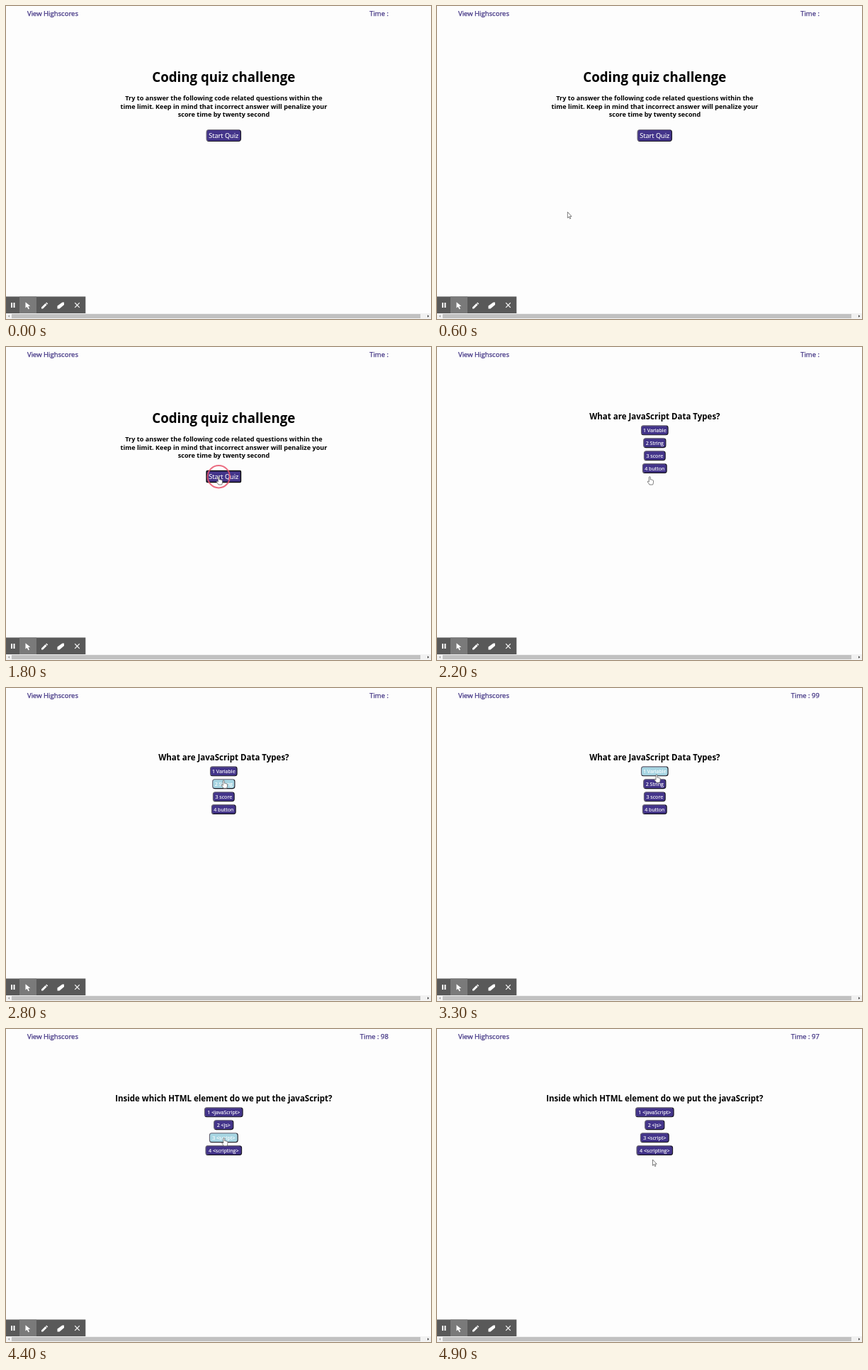
An HTML page that plays this animation: 600x441 px, repeating every 5 s.

```html
<!DOCTYPE html>
<html lang="en">
<head>
<meta charset="utf-8">
<title>Coding quiz</title>
<style>
html, body { margin: 0; width: 100%; height: 100%; overflow: hidden; background: #fdfdfd; }
svg { display: block; width: 600px; height: 441px; font-family: "Open Sans", "Noto Sans", sans-serif; }
.nav { font-size: 9.52px; fill: #3d2f80; stroke: #3d2f80; stroke-width: .25; }
.mid { text-anchor: middle; }
.bold { font-weight: 700; fill: #000; }
.btn rect { fill: #43348a; stroke: url(#bevel); stroke-width: 1.1; }
.btn text { fill: #fff; stroke: #fff; stroke-width: .15; text-anchor: middle; }
.btn.hover rect { fill: #a6d5e2; }
.btn.press rect { stroke: #080808; stroke-width: 1.4; }
</style>
</head>
<body>
<svg viewBox="0 0 600 441">
  <defs>
    <linearGradient id="bevel" x1="0" y1="0" x2="1" y2="1">
      <stop offset=".5" stop-color="#65606f"/>
      <stop offset=".5" stop-color="#17151f"/>
    </linearGradient>
  </defs>
  <rect width="600" height="441" fill="#fdfdfd"/>
  <text class="nav" x="30" y="13.5">View Highscores</text>
  <text class="nav" id="time" x="540" y="13.5" text-anchor="end">Time :</text>

  <g id="intro" class="mid bold">
    <text x="307.3" y="107" font-size="18.7">Coding quiz challenge</text>
    <g font-size="9.1">
      <text x="307.5" y="132.8">Try to answer the following code related questions within the</text>
      <text x="307.5" y="144.5">time limit. Keep in mind that incorrect answer will penalize your</text>
      <text x="307.5" y="156.2">score time by twenty second</text>
    </g>
  </g>
  <text id="question" class="mid bold" x="307.4" y="101.8" font-size="11.5"></text>
  <g id="buttons"></g>

  <g id="toolbar">
    <rect y="409.4" width="112.3" height="23.6" fill="#595959"/>
    <rect x="19" y="409.4" width="24" height="23.6" fill="#7a7a7a"/>
    <g fill="#fff">
      <path d="M7 418h2v7h-2zM10.5 418h2v7h-2z"/>
      <path d="M27.5 417.3V425.5L29.6 423.8L31.5 427.3L33 426.5L31.3 423.2L34.3 422.8Z"/>
      <path d="M50 426.6V424.5L55.5 419L57.6 421.1L52.1 426.6ZM56.1 418.4L57.2 417.4L59.2 419.4L58.2 420.5Z"/>
      <path d="M72.5 422.5L79.5 417.5H82V421L75.5 426.5H72.5Z"/>
    </g>
    <path d="M97.2 418.2L103.8 424.8M103.8 418.2L97.2 424.8" stroke="#fff" stroke-width="1.2"/>
  </g>
  <g id="scrollbar">
    <rect y="433" width="600" height="7.5" fill="#f1f1f1"/>
    <rect x="8" y="434" width="577" height="6" fill="#c1c1c1"/>
    <path d="M5 435.3V438.7L3 437Z" fill="#999"/>
    <path d="M595 435.2V438.8L597.3 437Z" fill="#444"/>
  </g>

  <circle id="ring" r="15.7" fill="none" stroke="#e8546c" stroke-width="2"/>
  <g id="cursor" fill="#fff" stroke="#555" stroke-width=".75" stroke-linejoin="round">
    <path id="arrow" d="M0 0V8.4L1.9 6.7L3.2 9.6L4.5 9L3.2 6.2H5.7Z"/>
    <path id="hand" d="M-1 1Q-1 0 0 0T1 1V4.2Q1.9 3.6 2.6 4.5Q3.5 4 4 4.9Q5.2 4.7 5.2 5.9V8Q5.2 9.4 4.3 11.3H-.3Q-1.1 9.7-3 7.5Q-3.2 6.2-2 6.4L-1 7.3Z"/>
  </g>
</svg>
<script>
const LOOP = 5000, STEP = 100, MID = 307.3;
const START = 1900, NEXT = 4200;
const CLICKS = [1800, 4100];

const screens = [
  { text: "", buttons: [["Start Quiz", 48.4]] },
  { text: "What are JavaScript Data Types?",
    buttons: [["1 Variable", 37.6], ["2 String", 31.2], ["3 score", 29.8], ["4 button", 33.8]] },
  { text: "Inside which HTML element do we put the javaScript?",
    buttons: [["1 <javaScript>", 53.6], ["2 <js>", 27.2], ["3 <script>", 39.8], ["4 <scripting>", 50.6]] }
];

// time, x, y of the pointer tip
const path = [
  [100, 118, 400], [400, 178, 300], [500, 178, 300], [1000, 239, 206],
  [1100, 239, 206], [1500, 300.3, 182.7], [2300, 300.3, 182.7], [3000, 309, 117],
  [3300, 310, 122], [3600, 310, 122], [4000, 310, 135], [4200, 310, 135],
  [4500, 307, 160], [4600, 307, 160], [4900, 304.5, 184]
];

const el = id => document.getElementById(id);
const show = (node, on) => node.setAttribute("display", on ? "inline" : "none");

function make(tag, attrs, parent) {
  const node = document.createElementNS("http://www.w3.org/2000/svg", tag);
  for (const k in attrs) node.setAttribute(k, attrs[k]);
  return parent.appendChild(node);
}

function makeButton(label, w, row, big, parent) {
  const h = big ? 16 : 12.8;
  const y = big ? 182.5 : 117.3 + 17.9 * row;
  const node = make("g", { class: "btn" }, parent);
  const rect = make("rect", { x: MID - w / 2, y: y - h / 2, width: w, height: h }, node);
  const size = big ? 9.2 : 7.1;
  make("text", { x: MID, y: y + size * .37, "font-size": size }, node).textContent = label;
  return { node, rect, big, hit: (px, py) => Math.abs(px - MID) < w / 2 && Math.abs(py - y) < h / 2 };
}

screens.forEach((s, i) => {
  s.group = make("g", {}, el("buttons"));
  s.buttons = s.buttons.map(([label, w], row) => makeButton(label, w, row, i === 0, s.group));
});

function pointer(t) {
  let i = 0;
  while (i < path.length - 2 && t >= path[i + 1][0]) i++;
  const [t0, x0, y0] = path[i], [t1, x1, y1] = path[i + 1];
  const u = Math.min(1, Math.max(0, (t - t0) / (t1 - t0)));
  const k = u * u * (3 - 2 * u);
  return [x0 + (x1 - x0) * k, y0 + (y1 - y0) * k];
}

function draw(t) {
  const current = t < START ? 0 : t < NEXT ? 1 : 2;
  const [x, y] = pointer(t);
  const pressed = CLICKS.some(c => t >= c && t < c + 100);
  let over = false;

  show(el("intro"), current === 0);
  el("question").textContent = screens[current].text;
  screens.forEach((s, i) => show(s.group, i === current));
  for (const b of screens[current].buttons) {
    const hit = b.hit(x, y), press = hit && pressed;
    over = over || hit;
    b.node.setAttribute("class", "btn" + (hit && !b.big ? " hover" : "") + (press ? " press" : ""));
    b.rect.setAttribute("rx", press ? 1.2 : b.big ? 3.4 : 3);
  }

  const ticks = Math.floor((t - START) / 1000);
  el("time").textContent = ticks > 0 ? "Time : " + (100 - ticks) : "Time :";

  const click = CLICKS.find(c => t >= c && t < c + 300);
  show(el("ring"), click !== undefined);
  if (click !== undefined) {
    const [cx, cy] = pointer(click);
    el("ring").setAttribute("cx", cx);
    el("ring").setAttribute("cy", cy);
    el("ring").setAttribute("opacity", .85 * (1 - (t - click) / 300));
  }

  const hand = over || (t >= START && t < 2300);
  show(el("cursor"), t >= path[0][0]);
  show(el("hand"), hand);
  show(el("arrow"), !hand);
  el("cursor").setAttribute("transform", `translate(${x} ${y})`);
}

const began = performance.now();
function tick() {
  const t = (performance.now() - began) % LOOP;
  draw(Math.floor(t / STEP) * STEP);
  requestAnimationFrame(tick);
}
tick();
</script>
</body>
</html>
```
